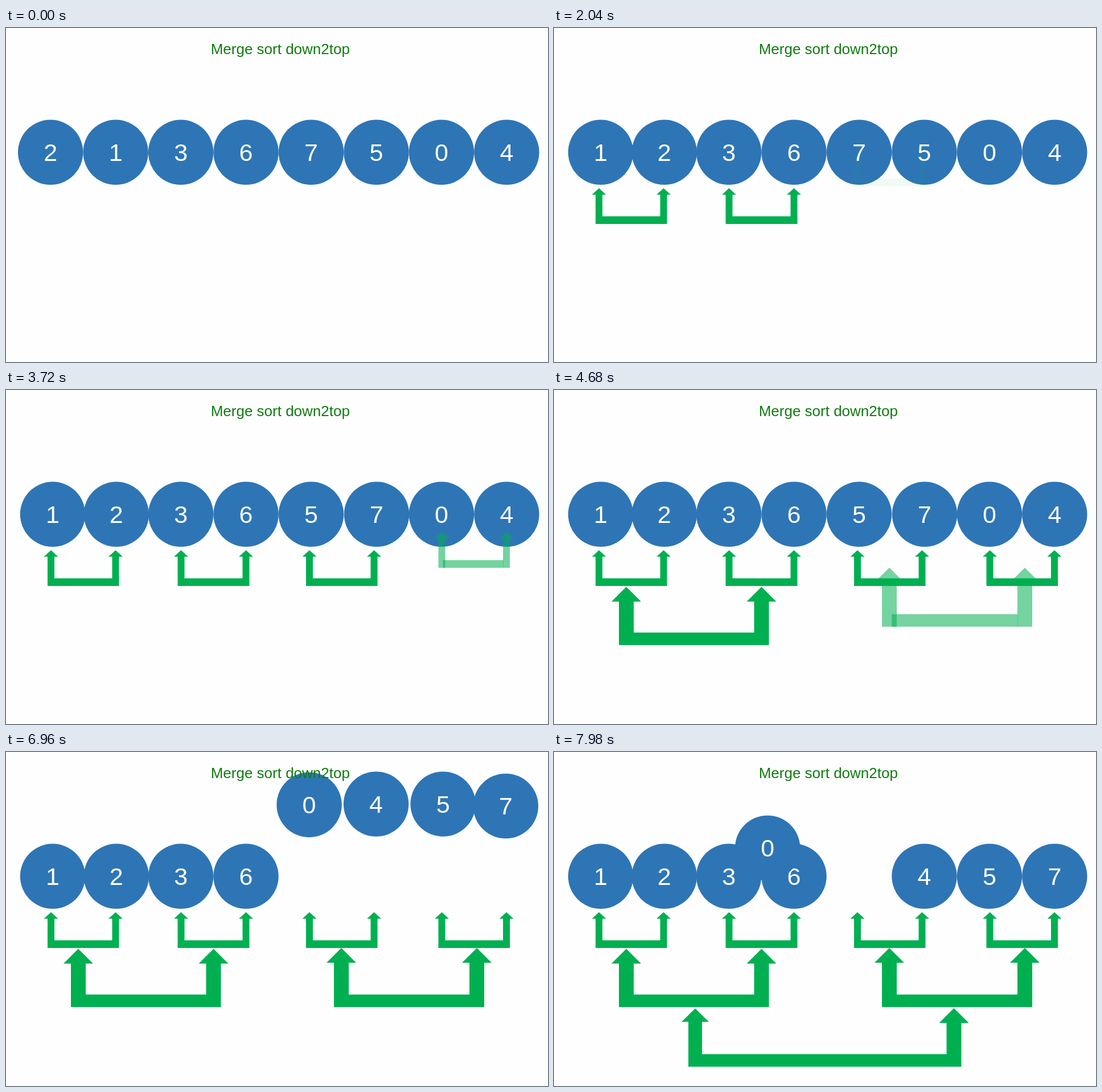
Write an HTML page that moves like this. It is 952 px wide and 588 px high and loops after 8000 ms.

```html
<!DOCTYPE html>
<html lang="en">
<head>
<meta charset="utf-8">
<title>Merge sort down2top</title>
<style>
  html, body { margin: 0; width: 100%; height: 100%; overflow: hidden; background: #fefefe; }
  svg { display: block; width: 100vw; height: 100vh; }
  text { font-family: "Liberation Sans", Arial, sans-serif; text-anchor: middle; }
  .title { font-size: 26px; fill: #107c10; }
  .ball circle { fill: #2e75b6; }
  .ball text { font-size: 43px; fill: #fff; }
  .fork { fill: #00b050; }
</style>
</head>
<body>
<svg viewBox="0 0 952 588">
  <g id="balls"></g>
  <g id="forks"></g>
  <text class="title" x="481.8" y="46">Merge sort down2top</text>
</svg>
<script>
const LOOP = 8000, TICK = 60, START = 92, UNIT = 481;
const ROW = 218.8, RADIUS = 57.2, DROP = 70;
const slot = i => 78.2 + 114.45 * i;

function make(parent, tag, attrs) {
  const el = document.createElementNS("http://www.w3.org/2000/svg", tag);
  for (const key in attrs) el.setAttribute(key, attrs[key]);
  parent.appendChild(el);
  return el;
}

const balls = {};
[2, 1, 3, 6, 7, 5, 0, 4].forEach((digit, i) => {
  const g = make(document.getElementById("balls"), "g", { class: "ball" });
  make(g, "circle", { r: RADIUS });
  make(g, "text", { y: 15.2 }).textContent = digit;
  balls[digit] = { g, home: [slot(i), ROW], at: [slot(i), ROW], moves: [] };
});

// Times are counted in units from START.
function addMove(digit, begin, span, to, control = "L") {
  const ball = balls[digit];
  const d = `M${ball.at} ${control} ${to}`;
  const path = document.createElementNS("http://www.w3.org/2000/svg", "path");
  path.setAttribute("d", d);
  ball.moves.push({ begin, span, path, length: path.getTotalLength() });
  ball.at = to;
}

// Both balls dip along mirrored U-shaped curves.
function dip(digit, begin, toX) {
  const fromX = balls[digit].at[0], lean = (toX - fromX) * 0.13, low = ROW + 157;
  addMove(digit, begin, 2, [toX, ROW], `C ${fromX + lean},${low} ${toX - lean},${low}`);
}

dip(2, 1, 193.8);
dip(1, 1, 82);
dip(7, 5, 651);
dip(5, 5, slot(4));

const lifted = [[0, 532, 73.5], [4, 650, 72], [5, 768, 72], [7, 877.5, 76]];
lifted.forEach(([digit, x, y], i) => addMove(digit, 10.02 + i, 1, [x, y]));
lifted.forEach(([digit], i) => addMove(digit, 14.02, 1, [slot(4 + i), ROW]));
addMove(0, 15.98, 1, [slot(0), 77]);

const forks = [];
function upArrow(parent, x, tip, bottom, stem, head) {
  const neck = tip + head.h, s = stem / 2, w = head.w / 2;
  make(parent, "path", {
    d: `M${x},${tip} L${x + w},${neck} H${x + s} V${bottom} H${x - s} V${neck} H${x - w} Z`
  });
}

function addFork(begin, left, right, bottom, bar) {
  const g = make(document.getElementById("forks"), "g", { class: "fork" });
  for (const a of [left, right]) upArrow(g, a.x, a.tip, bottom, a.stem, a.head);
  const x = left.x + left.stem / 6;
  make(g, "rect", { x, y: bottom - bar, width: right.x - right.stem / 2 + 0.5 - x, height: bar });
  forks.push({ g, begin });
}

const small = x => ({ x, tip: 282, stem: 12, head: { w: 25, h: 11.5 } });
const big = (x, tip) => ({ x, tip, stem: 26, head: { w: 52, h: 26 } });

addFork(0, small(79), small(192.5), 345, 13.5);
addFork(3, small(307.5), small(421.5), 345, 13.5);
addFork(4, small(533), small(646.5), 345, 13.5);
addFork(7, small(765.5), small(879), 345, 13.5);
addFork(8, big(127, 346.5), big(364.5, 346.5), 449, 22);
addFork(9, big(589, 345), big(827, 345), 449, 22);
addFork(15, { x: 248, tip: 451.5, stem: 24, head: { w: 48, h: 23.5 } }, big(702.5, 451), 554, 22);

const clamp = v => Math.min(1, Math.max(0, v));
const ease = t => t < 0.5 ? 2 * t * t : 1 - 2 * (1 - t) * (1 - t);

function draw(ms) {
  const now = (ms - START) / UNIT;
  for (const { g, home, moves } of Object.values(balls)) {
    let [x, y] = home;
    for (const m of moves) {
      if (now < m.begin) break;
      ({ x, y } = m.path.getPointAtLength(m.length * ease(clamp((now - m.begin) / m.span))));
    }
    g.setAttribute("transform", `translate(${x} ${y})`);
  }
  for (const { g, begin } of forks) {
    const p = clamp(now - begin);
    g.setAttribute("fill-opacity", p);
    g.setAttribute("transform", `translate(0 ${-DROP * (1 - p)})`);
  }
}

let origin;
function frame(time) {
  origin ??= time;
  const ms = (time - origin) % LOOP;
  draw(Math.floor(ms / TICK) * TICK);
  requestAnimationFrame(frame);
}
draw(0);
requestAnimationFrame(frame);
</script>
</body>
</html>
```
